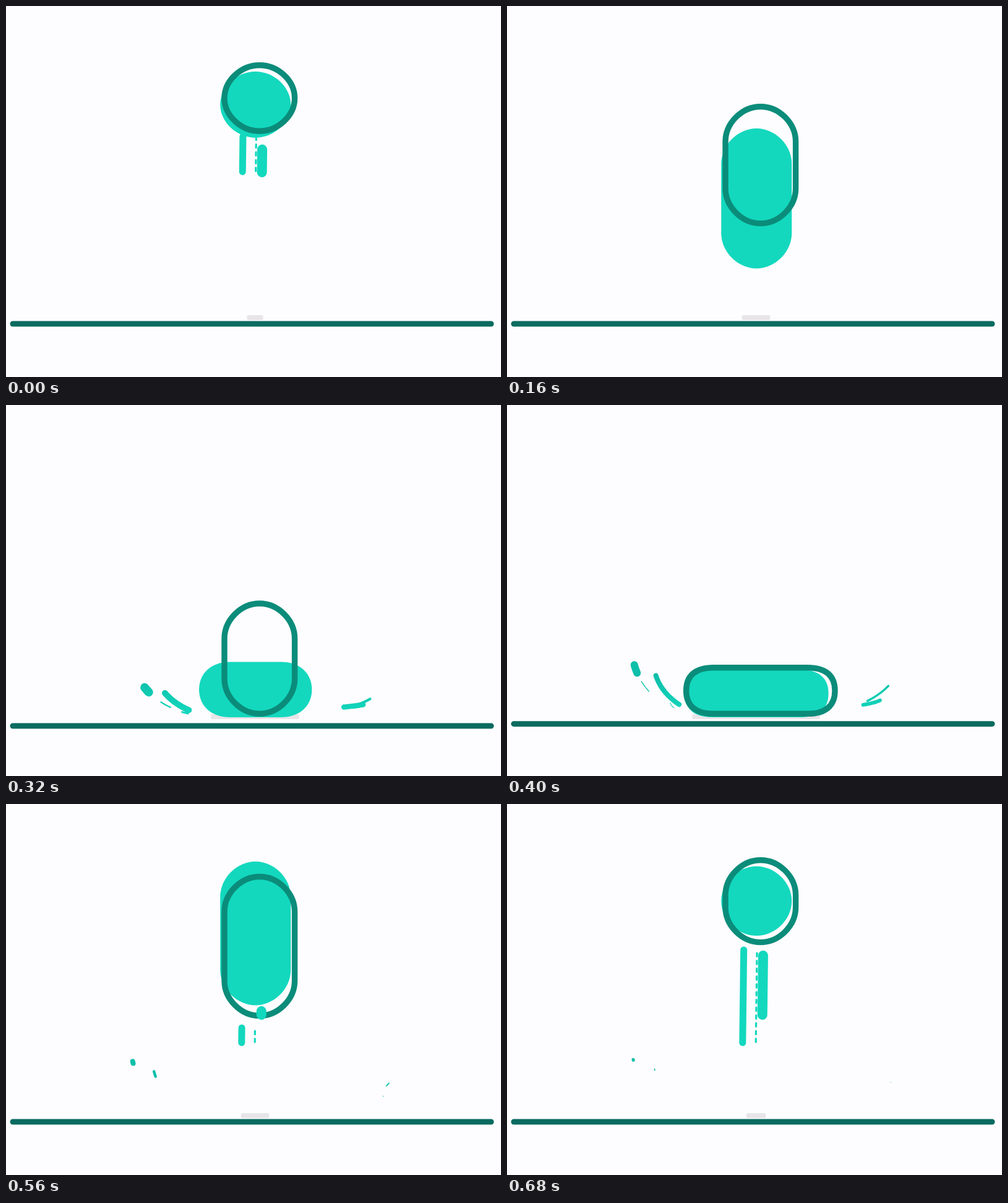
Animation, 800 px wide and 600 px high, one loop 720 ms. Source, as an HTML page with a canvas:

```html
<!DOCTYPE html>
<html>
<head>
<meta charset="utf-8">
<title>Bouncing drop</title>
<style>
  html, body { margin: 0; width: 100%; height: 100%; overflow: hidden; background: #fdfcfe; }
  canvas { display: block; }
</style>
</head>
<body>
<canvas id="stage" width="800" height="600"></canvas>
<script>
const ctx = document.getElementById('stage').getContext('2d');
const STEP = 40, STEPS = 18, REBOUND = 10;
const PAPER = '#fdfcfe', MINT = '#13d8be', TEAL = '#0b8c7a', GROUND = '#0a6b60', SHADOW = '#e8e5e8';

// Each edge falls from home to rest, then eases back home between begin and end.
// The bezier pair shapes the way back; values above 1 overshoot.
const fill = {
  x: 403.2, radius: 57,
  top: { home: 106, rest: 428, pull: 8.13, begin: 10, end: 18, bezier: [1.44, 1] },
  bottom: { home: 213, rest: 505, pull: 18.7, begin: 10, end: 17, bezier: [.8, .42] }
};
const ring = {
  x: 409.8, radius: 61.5,
  top: { home: 91, rest: 420, pull: 5.92, begin: 11.25, end: 18, bezier: [1.33, 1] },
  bottom: { home: 207, rest: 504, pull: 13.2, begin: 11, end: 18, bezier: [.41, .88] }
};

// Trails that grow upwards from low and let go when the ball is back on top
const drips = [
  { x: 382.6, width: 11, start: 12, low: 386, high: 211, lift: 118, dash: [] },
  { x: 414, width: 16, start: 13, low: 341, high: 232, lift: 72, dash: [] },
  { x: 404, width: 3.2, start: 12, low: 385, high: 214, lift: 118, dash: [5.4, 7.2] }
];

// Droplets fly along a curve: length and width are those at the rebound, gap is the way left then
const leftArc = [[345, 503], [265, 505], [213, 468], [203, 408]];
const splashes = [
  { curve: leftArc, born: 6, end: 22, gap: .07, length: .08, width: 12 },
  { curve: leftArc, born: 5.5, end: 13, gap: .24, length: .12, width: 1.4 },
  { curve: [[347, 503], [293, 505], [244, 470], [238, 426]], born: 6, end: 19, gap: .09, length: .44, width: 8 },
  { curve: [[345, 503], [300, 503], [268, 496], [264, 482]], born: 7, end: 11.5, gap: 0, length: .2, width: 1.3 },
  { curve: [[465, 500], [540, 500], [592, 484], [622, 448]], born: 6, end: 19, gap: .06, length: .29, width: 3.5 },
  { curve: [[452, 497], [540, 488], [600, 488], [611, 471]], born: 5.8, end: 15, gap: .15, length: .25, width: 6 }
];

const splashColor = ctx.createLinearGradient(0, 440, 0, 500);
splashColor.addColorStop(0, '#0dbfa9');
splashColor.addColorStop(1, MINT);

const clamp = t => Math.max(0, Math.min(1, t));

function cubic(t, p0, p1, p2, p3) {
  const u = 1 - t;
  return u * u * u * p0 + 3 * u * u * t * p1 + 3 * u * t * t * p2 + t * t * t * p3;
}

function edgeAt({ home, rest, pull, begin, end, bezier }, k) {
  if (k < REBOUND) return Math.min(rest, home + pull * k ** 1.75);
  return rest + (home - rest) * cubic(clamp((k - begin) / (end - begin)), 0, ...bezier, 1);
}

// A flattened shape spreads sideways
function pose({ x, radius, top, bottom }, k) {
  const y0 = edgeAt(top, k), y1 = edgeAt(bottom, k);
  const spread = 2 * Math.max(0, 2 * radius - 7.3 - (y1 - y0));
  return { x, radius, y0, y1, spread };
}

function tracePill({ x, radius, y0, y1, spread }, inset = 0) {
  const half = radius + spread - inset, l = x - half, r = x + half;
  const top = y0 + inset, bottom = y1 - inset;
  const rx = radius - inset - spread * .2;
  const ry = Math.min(radius - inset, (bottom - top) / 2);
  const roundness = .53 + spread * .002;
  const ox = rx * (1 - roundness), oy = ry * (1 - roundness);
  ctx.beginPath();
  ctx.moveTo(l + rx, top);
  ctx.lineTo(r - rx, top);
  ctx.bezierCurveTo(r - ox, top, r, top + oy, r, top + ry);
  ctx.lineTo(r, bottom - ry);
  ctx.bezierCurveTo(r, bottom - oy, r - ox, bottom, r - rx, bottom);
  ctx.lineTo(l + rx, bottom);
  ctx.bezierCurveTo(l + ox, bottom, l, bottom - oy, l, bottom - ry);
  ctx.lineTo(l, top + ry);
  ctx.bezierCurveTo(l, top + oy, l + ox, top, l + rx, top);
  ctx.closePath();
}

function bar(x, y, w, h, radius, color) {
  ctx.fillStyle = color;
  ctx.beginPath();
  ctx.roundRect(x, y, w, h, radius);
  ctx.fill();
}

function strokePath(points, width, color, dash = []) {
  ctx.strokeStyle = color;
  ctx.lineWidth = width;
  ctx.setLineDash(dash);
  ctx.beginPath();
  points.forEach(p => ctx.lineTo(...p));
  ctx.stroke();
  ctx.setLineDash([]);
}

function drawDrip({ x, width, start, low, high, lift, dash }, k) {
  if (k < start) return;
  const top = Math.max(high, low - 6 * (k - start) ** 2);
  const bottom = low - lift * Math.max(0, k - STEPS + 1) + .01;
  const point = y => [x - (y - 240) * .0125, y];
  strokePath([point(bottom), point(top)], width, MINT, dash);
}

function drawSplash({ curve, born, end, gap, length, width }, k) {
  if (k <= born || k >= end) return;
  const left = (end - k) / (end - REBOUND);
  const burst = 1 - (1 - clamp((k - born) / (REBOUND - born))) ** 2;
  const head = (1 - gap * left) * burst;
  const tail = head - length * burst * Math.exp(-4.3 * Math.max(0, 1 - left));
  const points = Array.from({ length: 17 }, (_, i) => {
    const t = tail + (head - tail) * i / 16;
    return [0, 1].map(axis => cubic(t, ...curve.map(p => p[axis])));
  });
  strokePath(points, width * left, splashColor);
}

function draw() {
  const k = Math.floor(performance.now() / STEP) % STEPS;
  const fillPose = pose(fill, k), ringPose = pose(ring, k);
  ctx.fillStyle = PAPER;
  ctx.fillRect(0, 0, 800, 600);
  ctx.lineCap = 'round';

  const reach = 13 + 15 * Math.sin(Math.PI * k / STEPS) + 1.27 * fillPose.spread;
  bar(402.5 - reach, 500, reach * 2, 8, 2, SHADOW);
  const dent = k > 5 && k < 10.6 ? 5 * Math.sin(Math.PI * (k - 5) / 5.6) : 0;
  bar(6.5, 509.5 + dent, 782, 9, 4.5, GROUND);

  tracePill(fillPose);
  ctx.fillStyle = MINT;
  ctx.fill();

  const line = 9.4;
  tracePill(ringPose, line / 2);
  ctx.strokeStyle = TEAL;
  ctx.lineWidth = line;
  ctx.stroke();

  drips.forEach(d => drawDrip(d, k || STEPS));
  splashes.forEach(s => drawSplash(s, k));
  requestAnimationFrame(draw);
}
draw();
</script>
</body>
</html>
```
